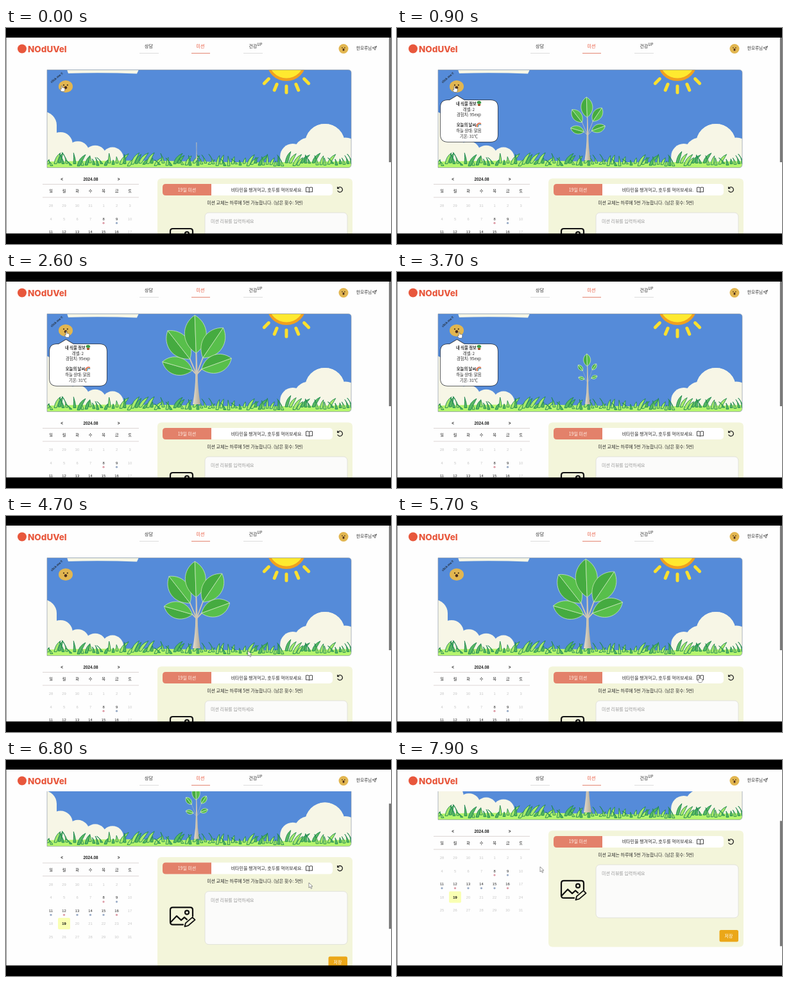
Recreate the animation shown at these times as an HTML page. Size 600 by 338 pixels, loop 8000 ms.

```html
<!DOCTYPE html>
<html>
<head>
<meta charset="utf-8">
<title>Daily mission</title>
<style>
  html, body { margin: 0; width: 100%; height: 100%; overflow: hidden; background: #000; }
  svg { display: block; width: 600px; height: 338px; }
  text { font: 7px "Noto Sans CJK KR", "Noto Sans CJK", sans-serif; text-anchor: middle; fill: #2b2b2b; }
  .start { text-anchor: start; }
  .logo { font: 800 13.5px Inter, sans-serif; fill: #e8573c; text-anchor: start; }
  .call { font: 600 4.7px "Noto Sans", sans-serif; fill: #26303c; }
  .tip text { font-size: 6.3px; }
  .tip .b { font-weight: 700; }
  .day { font-size: 6.2px; }
  .num { font: 5.8px "Liberation Sans", Arial, sans-serif; fill: #c6c6c6; }
  .num.on { fill: #222; }
  .num.b { font-weight: 700; fill: #111; }
  .cal { font: 700 6.4px "Liberation Sans", Arial, sans-serif; fill: #222; }
  .leaf path { vector-effect: non-scaling-stroke; }
</style>
</head>
<body>
<svg viewBox="0 0 600 338">
  <defs>
    <path id="frame" d="M64 65.500H533Q538 65.500 538 70V213Q538 218.500 533 218.500H64Z"/>
    <clipPath id="sceneClip"><use href="#frame"/></clipPath>
    <path id="bubble" d="M82 114L93.500 107L105 114H146Q156 114 156 124V167Q156 177 146 177H79Q69 177 69 167V124Q69 114 79 114Z"/>
    <linearGradient id="bark">
      <stop offset="0" stop-color="#e3ddcf"/><stop offset="1" stop-color="#b3a892"/>
    </linearGradient>
    <g id="face">
      <ellipse rx="11" ry="9.500" fill="#e2b650"/>
      <circle cx="-3" cy="-2.200" r="1.100" fill="#3c2a18"/>
      <circle cx="2.800" cy="-2.200" r="1.100" fill="#3c2a18"/>
      <ellipse cy="1.800" rx="2.200" ry="2.400" fill="#4a2c1c"/>
    </g>
  </defs>

  <rect width="600" height="338" fill="#fefefe"/>

  <g id="page">
    <g clip-path="url(#sceneClip)">
      <rect x="64" y="65" width="474" height="154" fill="#558bd9"/>
      <path d="M95 65L97 71Q150 69.500 204 71.500L207 65Z" fill="#f7f6e6"/>
      <g id="clouds" stroke="#f7f6e6" stroke-linecap="round"></g>
      <g id="rays" stroke="#fbe02f" stroke-width="5" stroke-linecap="round"></g>
      <circle cx="437" cy="52" r="31" fill="#f0a01f"/>
      <circle cx="437" cy="51" r="27.500" fill="#ffe92f"/>
      <path d="M64 209Q180 206 300 209T538 208V219H64Z" fill="#b5f56e"/>
      <g id="grass" stroke="#1f8653" stroke-width=".9" stroke-linejoin="round"></g>
      <path id="trunk" fill="url(#bark)"/>
      <g id="stalks" stroke="#cfc6b4" stroke-linecap="round"></g>
      <g id="leaves"></g>
    </g>
    <use href="#frame" fill="none" stroke="#8d9aa6" stroke-width=".7"/>

    <text class="call" id="call">click me !!</text>
    <use href="#face" x="93" y="91.500"/>

    <g class="tip" id="tip">
      <use href="#bubble" fill="#fff" stroke="#2c3038" stroke-width="3.400"/>
      <use href="#bubble" fill="#fff" stroke="#fff" stroke-width="1.900"/>
      <text class="b" x="108" y="120.500">내 식물 정보</text>
      <path d="M125.500 119H130.500L129.600 122H126.400Z" fill="#a8552c"/>
      <path d="M128 119Q123 118 125 115Q128 113 130.500 115Q133 118 128 119Z" fill="#3d9b45"/>
      <text x="112" y="129.500">레벨: 2</text>
      <text x="112" y="138.300">경험치: 95exp</text>
      <text class="b" x="108" y="154.300">오늘의 날씨</text>
      <g fill="none" stroke-width="1.200">
        <path d="M124.500 155A4.500 4.500 0 0 1 131 149.500" stroke="#d8433b"/>
        <path d="M125.800 155A3.500 3.500 0 0 1 131 150.800" stroke="#efc33a"/>
        <path d="M127 155A2.500 2.500 0 0 1 131 152" stroke="#4a8bd6"/>
      </g>
      <text x="112" y="162.900">하늘 상태: 맑음</text>
      <text x="112" y="172.300">기온: 31℃</text>
    </g>

    <g id="calendar">
      <text class="cal" x="87" y="238.800">&lt;</text>
      <text class="cal" x="132" y="238.800">2024.08</text>
      <text class="cal" x="175.500" y="238.800">&gt;</text>
      <path d="M57 244.500H207M57 265H207" stroke="#d2cac8" stroke-width=".8"/>
      <rect x="81" y="330.500" width="19" height="18" rx="2" fill="#f9ffb3"/>
    </g>

    <rect x="236" y="235.500" width="304" height="182" rx="6" fill="#f3f5da"/>
    <rect x="250" y="244" width="259" height="18" rx="5" fill="#fff"/>
    <path d="M320 244H249Q244 244 244 249V257Q244 262 249 262H320Z" fill="#e3816a"/>
    <text x="282" y="255.600" style="fill:#fff3ea">19일 미션</text>
    <text x="406.500" y="255.600">비타민을 챙겨먹고, 호두를 먹어보세요.</text>
    <path d="M472.500 250Q470 248.500 467.500 249.500V256.500Q470 255.500 472.500 257Q475 255.500 477.500 256.500V249.500Q475 248.500 472.500 250V257" fill="none" stroke="#333" stroke-width=".9"/>
    <path d="M517.400 250.200A4 4 0 1 1 516.700 254.500M516.600 248.500V251.200H519.400" fill="none" stroke="#222" stroke-width="1.300"/>
    <text x="388" y="275.700">미션 교체는 하루에 5번 가능합니다. (남은 횟수: 5번)</text>
    <rect x="310" y="289" width="222" height="83" rx="6" fill="#fbfbfa" stroke="#dcdcd6" stroke-width=".8"/>
    <text class="start" x="319" y="305" style="fill:#9a9a9a">미션 리뷰를 입력하세요</text>
    <g fill="none" stroke="#111" stroke-width="2.200" stroke-linejoin="round" stroke-linecap="round">
      <path d="M276 341H260Q256 341 256 337V318Q256 314 260 314H287Q291 314 291 318V328"/>
      <path d="M257 337L266 327.500L273 334L278 329.500L282 333"/>
      <circle cx="282" cy="322" r="3"/>
      <path d="M278.500 344L280 338.500L290.500 329.500L294.500 333.500L284 342.500Z" fill="#f3f5da" stroke-width="1.900"/>
    </g>
    <rect x="502.500" y="391" width="29.500" height="18.500" rx="2.500" fill="#eba718"/>
    <text x="517" y="402.800" style="fill:#fff">저장</text>
  </g>

  <rect y="14" width="600" height="35" fill="#fefefe"/>
  <circle cx="25" cy="32.500" r="7" fill="#e8573c"/>
  <text class="logo" x="34" y="37.500">NOdUVel</text>
  <text x="222.500" y="30.700">상담</text>
  <text x="303" y="30.700" style="fill:#e8573c">미션</text>
  <text x="385" y="30.700">건강</text>
  <text x="395.500" y="27.500" style="font-size:5.8px">UP</text>
  <path d="M208 39.500H238M370 39.500H400" stroke="#d9d9d9" stroke-width=".9"/>
  <path d="M289 39.500H318" stroke="#e58a79" stroke-width="1.100"/>
  <use href="#face" transform="translate(526 32.500) scale(.68 .78)"/>
  <text x="558" y="34" style="font-size:6.6px">한모루님</text>
  <path d="M571 31L577.500 28.500L575 34.500L573.600 32.300ZM573.600 32.300L577.500 28.500" fill="none" stroke="#333" stroke-width=".7"/>

  <rect id="thumb" x="596.800" width="3.200" height="196" fill="#777"/>
  <g id="cursor" fill="#fff" stroke="#555" stroke-width=".6" stroke-linejoin="round">
    <path id="arrow" d="M0 0V8L2 6.300L3.400 9.400L4.800 8.700L3.400 5.800H6Z"/>
    <path id="hand" d="M-.8 .5Q0 -.6 .8 .5V3.200Q4.800 3 4.800 5V7Q4.600 8.800 3.500 9.500H-.5L-3 5.800Q-2.600 4.800 -.8 6Z"/>
  </g>
  <path d="M.4 14V322" stroke="#666" stroke-width=".8"/>
  <path d="M0 0H600V14.900H0ZM0 321.600H600V338H0Z"/>
</svg>

<script>
const LOOP = 8000, PLANT = 3050, RAD = Math.PI / 180;
const $ = id => document.getElementById(id);
const put = (id, html) => $(id).insertAdjacentHTML('beforeend', html);
const show = (id, on) => $(id).style.display = on ? '' : 'none';
const ramp = (t, from, span) => Math.min(1, Math.max(0, (t - from) / span));
const glide = (t, from, span) => { const k = ramp(t, from, span); return k * k * (3 - 2 * k); };
const within = (t, a, b) => t >= a && t < b;

// Puffs shrink and sink towards the ground with each step
function cloud(x, y, r, step, count) {
  for (let i = 0; i < count; i++) {
    const fade = .45 ** i, px = x + step * i;
    put('clouds', `<path d="M${px} ${206 - (206 - y) * fade}V240" stroke-width="${34 + 2 * (r - 17) * fade}"/>`);
  }
}

function buildScene() {
  cloud(58, 152, 21, 27, 5);
  cloud(497, 181, 31, -25, 3);
  cloud(497, 181, 31, 32, 2);
  for (let a = -45; a <= 45; a += 22.5)
    put('rays', `<path d="M437 91V101" transform="rotate(${a} 437 52)"/>`);
}

function buildGrass() {
  let seed = 19;
  const rnd = () => (seed = (seed * 16807) % 2147483647) / 2147483647;
  for (let x = 65; x < 540; x += 6) {
    const h = 7 + rnd() * 11, lean = (rnd() - .4) * 22, y = 211 + rnd() * 5;
    put('grass', `<path fill="${rnd() < .5 ? '#58b961' : '#a9ea6c'}" d="M${x - 2} ${y}Q${x + lean * .1 - 1} ${y - h * .7} ${x + lean} ${y - h}Q${x + lean * .4 + 2} ${y - h * .5} ${x + 2} ${y}Z"/>`);
  }
}

function buildCalendar() {
  const col = i => 70 + i * 20.5;
  [...'일월화수목금토'].forEach((d, i) => put('calendar', `<text class="day" x="${col(i)}" y="257.300">${d}</text>`));
  for (let i = 0; i < 35; i++) {
    const day = (i + 27) % 31 + 1, x = col(i % 7), y = 278.3 + Math.floor(i / 7) * 20.5;
    const done = day >= 8 && day <= 16 && day !== 10;
    put('calendar', `<text class="num ${done ? 'on' : ''} ${day === 19 ? 'b' : ''}" x="${x}" y="${y + 2}">${day}</text>`);
    if (done) put('calendar', `<circle cx="${x}" cy="${y + 6.4}" r="1.600" fill="${day % 4 ? '#98aac6' : '#dd9aa6'}"/>`);
  }
}

const fan = [-74, -38, -2, 34, 70];
function buildPlant() {
  const leaf = `<g class="leaf" stroke="#d9efc4" stroke-width=".7">
    <path fill="#45ab40" d="M0 0C-.4 -.28 -.36 -.78 0 -1Z"/>
    <path fill="#58bf4b" d="M0 0C.4 -.28 .36 -.78 0 -1Z"/></g>`;
  put('leaves', leaf.repeat(fan.length));
  put('stalks', '<path/>'.repeat(fan.length));
}

function drawPlant(t) {
  const q = (t + 150) % PLANT, x = 297, ground = 207;
  const grown = ramp(q, 0, 1550) ** .45, height = 80 * grown, half = 6 * grown ** 1.5;
  const node = ground - height * .58, bend = ground - height * .3;
  $('trunk').setAttribute('d', `M${x - half} ${ground}Q${x - half * .3} ${bend} ${x - half * .3} ${node}L${x - .6} ${ground - height}H${x + .4}L${x + half * .3} ${node}Q${x + half * .3} ${bend} ${x + half} ${ground}Z`);
  fan.forEach((angle, i) => {
    const upright = Math.cos(angle * RAD), delay = upright > .9 ? 400 : 600;
    const size = ramp(q, delay, 1550 - delay) + .07 * glide(q, 2200, 700);
    const stalk = height * .42 * upright, turn = angle * .6 * RAD;
    const bx = x + stalk * Math.sin(turn), by = node - stalk * Math.cos(turn);
    const leaf = $('leaves').children[i], line = $('stalks').children[i];
    leaf.setAttribute('transform', `translate(${bx} ${by}) rotate(${angle}) scale(${(42 + 14 * upright) * size})`);
    line.setAttribute('d', `M${x} ${node}L${bx} ${by}`);
    line.setAttribute('stroke-width', 1.7 * size);
    leaf.style.display = line.style.display = size > .02 ? '' : 'none';
  });
}

const scrollStarts = [5780, 6380, 6880];
const stops = [[4650, 377, 211], [5700, 471, 251], [6600, 472, 192], [7850, 223, 167]];

function drawCursor(t) {
  let x = 87 + 10 * ramp(t, 0, 3700), y = 90 + 4 * ramp(t, 0, 3700);
  for (const [arrive, sx, sy] of stops) {
    const k = glide(t, arrive - 700, 700);
    x += (sx - x) * k;
    y += (sy - y) * k;
  }
  $('cursor').setAttribute('transform', `translate(${x} ${y})`);
  const pointing = t < 4000 || within(t, 5600, 6350);
  show('hand', pointing);
  show('arrow', !pointing);
}

function draw(t) {
  drawPlant(t);
  drawCursor(t);
  const y = scrollStarts.reduce((sum, from) => sum + 41.7 * glide(t, from, 240), 0);
  $('page').setAttribute('transform', `translate(0 ${-y})`);
  $('thumb').setAttribute('y', 14 + y * .65);
  show('tip', within(t, 400, 3950));
  $('call').setAttribute('transform', `translate(80 79) rotate(${-39 + 3 * Math.sin(t * .36 * RAD)})`);
}

buildScene();
buildGrass();
buildCalendar();
buildPlant();
const start = performance.now();
function tick() {
  draw((performance.now() - start) % LOOP);
  requestAnimationFrame(tick);
}
tick();
</script>
</body>
</html>
```
